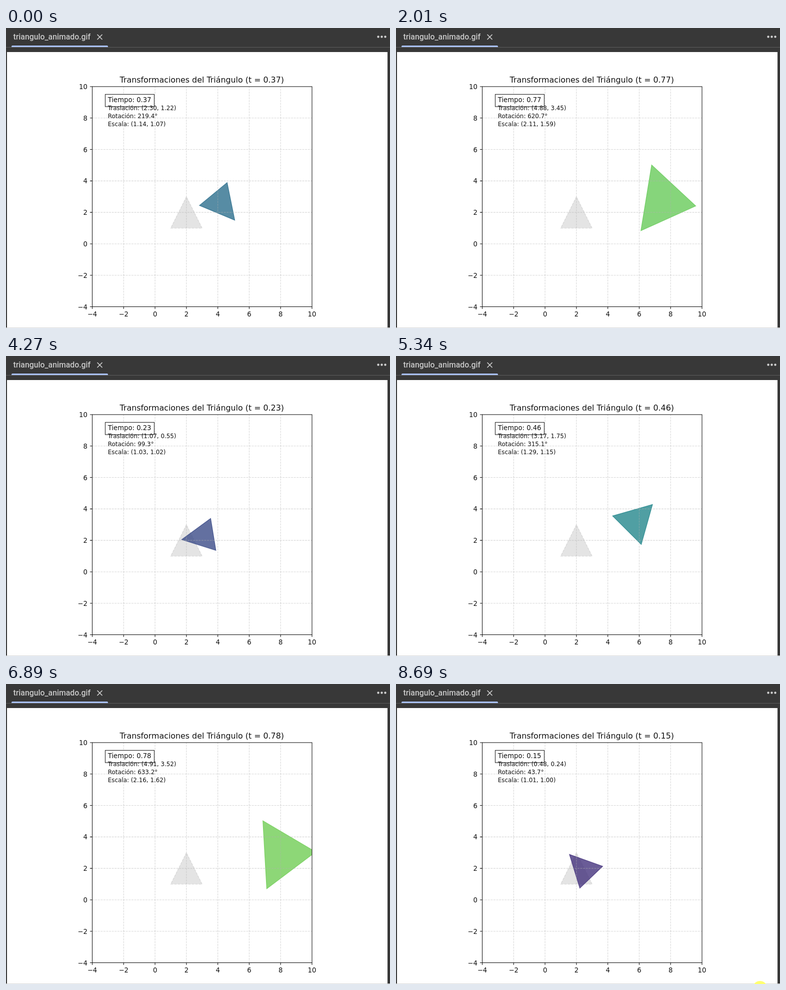
These frames come from a looping animation (768 by 599 pixels, 8.76 s). An HTML page:

```html
<!DOCTYPE html>
<html lang="es">
<head>
<meta charset="utf-8">
<title>Transformaciones del Triángulo</title>
<style>
  html, body { margin: 0; width: 100%; height: 100%; overflow: hidden; background: #383838; }
  svg { display: block; width: 100vw; height: 100vh; }
  text { font-family: "DejaVu Sans", sans-serif; font-size: 13.2px; fill: #111; }
  .tab { font: 500 15.8px Roboto, sans-serif; fill: #c9c9c9; }
  .title { font-size: 15.87px; text-anchor: middle; }
  .info text { font-size: 11.9px; }
  .xlabel { text-anchor: middle; }
  .ylabel { text-anchor: end; }
  .grid { stroke: #b0b0b0; stroke-opacity: .5; stroke-width: 1.06; stroke-dasharray: 3.9 1.7; }
  .tick { stroke: #111; stroke-width: 1.06; }
</style>
</head>
<body>
<svg viewBox="0 0 768 599" preserveAspectRatio="none">
  <defs><clipPath id="axes"><rect x="172.5" y="117" width="439.5" height="439.5"/></clipPath></defs>

  <rect width="768" height="599" fill="#383838"/>
  <rect y="38" width="768" height="1" fill="#5e5e5e"/>
  <path d="M11 38v-1q0-2 2-2h189q2 0 2 2v1z" fill="#a8c0f4"/>
  <text class="tab" x="14.5" y="23">triangulo_animado.gif</text>
  <path d="M182.5 13l10 10m0-10l-10 10" stroke="#d0d0d0" stroke-width="1.7"/>
  <g fill="#d0d0d0">
    <circle cx="744.5" cy="17.5" r="2.2"/><circle cx="751.5" cy="17.5" r="2.2"/><circle cx="758.5" cy="17.5" r="2.2"/>
  </g>
  <rect x="2" y="48" width="761" height="550" fill="#fff"/>
  <rect x="0" y="598" width="768" height="1" fill="#d9d9d9"/>

  <g clip-path="url(#axes)">
    <polygon id="ghost" fill="#808080" fill-opacity=".21" stroke="#808080" stroke-opacity=".21"
      stroke-width="1.32" stroke-dasharray="4.9 2.1"/>
    <polygon id="shape" fill-opacity=".8" stroke-opacity=".8" stroke-width="1.32"/>
    <g id="grid"></g>
  </g>
  <g id="ticks"></g>
  <rect x="172.5" y="117" width="439.5" height="439.5" fill="none" stroke="#111" stroke-width="1.06"/>

  <text id="title" class="title" x="391.8" y="109"></text>
  <rect x="198.5" y="132.5" width="98" height="24.5" fill="#fff" fill-opacity=".8" stroke="#333" stroke-width="1.2"/>
  <text id="time" x="203.8" y="148"></text>
  <g class="info">
    <text id="move" x="203.8" y="163.5"></text>
    <text id="turn" x="203.8" y="179.5"></text>
    <text id="size" x="203.8" y="195.7"></text>
  </g>
  <circle id="pointer" cx="728" cy="608" r="15" fill="#ffff70"/>
</svg>
<script>
const LOOP = 8760, STEPS = 120, UNIT = 439.5 / 14;
const $ = id => document.getElementById(id);
const px = x => 172.5 + (x + 4) * UNIT;
const py = y => 556.5 - (y + 4) * UNIT;
const points = list => list.map(([x, y]) => px(x).toFixed(2) + ',' + py(y).toFixed(2)).join(' ');

const triangle = [[1, 1], [3, 1], [2, 3]];
const center = [2, 5 / 3];
const viridis = ['440154', '482475', '414487', '355f8d', '2a788e', '21918c', '22a884', '44bf70', '7ad151', 'bddf26', 'fde725']
  .map(hex => [0, 2, 4].map(i => parseInt(hex.substr(i, 2), 16)));

// Redraw schedule: [ms, redraw count], evenly spaced in between.
const schedule = [[0, 0], [130, 1], [990, 14], [1060, 15], [1260, 18], [1880, 27], [1950, 28], [2770, 40],
  [2840, 41], [3680, 53], [3740, 54], [4270, 62], [4600, 67], [4660, 68], [5480, 80], [5550, 81],
  [6350, 93], [6420, 94], [6490, 95], [7360, 108], [7420, 109], [7560, 111], [8290, 122], [8350, 123], [8690, 128]];
// Playback progress: [ms, step].
const progress = [[0, 44], [1260, 75], [2770, 112], [4270, 149], [6350, 202], [7560, 232], [8690, 260]];

function interpolate(knots, v, from = 0, to = 1) {
  let i = 1;
  while (i < knots.length - 1 && v > knots[i][from]) i++;
  const a = knots[i - 1], b = knots[i];
  return a[to] + (b[to] - a[to]) * (v - a[from]) / (b[from] - a[from]);
}

const redraws = Array.from({ length: 129 }, (_, n) => Math.round(interpolate(schedule, n, 1, 0) / 10) * 10);

function color(t) {
  const i = Math.min(9, Math.floor(t * 10)), f = t * 10 - i;
  return `rgb(${viridis[i].map((c, k) => Math.round(c + (viridis[i + 1][k] - c) * f))})`;
}

// Two decimals, with exact ties going to the even digit.
const fixed = v => (v * 8 % 4 === 1 ? v - .001 : v).toFixed(2);

function draw(t) {
  const s = t * t * (3 - 2 * t);
  const move = [5 * Math.sin(s * Math.PI / 2), 4 * s];
  const size = [1 + 1.5 * s * s, 1 + .8 * s * s];
  const angle = 720 * s, rad = angle * Math.PI / 180;
  const cos = Math.cos(rad), sin = Math.sin(rad);

  // Scale about the origin, rotate about the centroid, then translate.
  $('shape').setAttribute('points', points(triangle.map(([x, y]) => {
    const dx = x * size[0] - center[0], dy = y * size[1] - center[1];
    return [center[0] + move[0] + dx * cos - dy * sin, center[1] + move[1] + dx * sin + dy * cos];
  })));
  $('shape').setAttribute('fill', color(t));
  $('shape').setAttribute('stroke', color(t));
  $('title').textContent = `Transformaciones del Triángulo (t = ${fixed(t)})`;
  $('time').textContent = `Tiempo: ${fixed(t)}`;
  $('move').textContent = `Traslación: (${move.map(fixed).join(', ')})`;
  $('turn').textContent = `Rotación: ${angle.toFixed(1)}°`;
  $('size').textContent = `Escala: (${size.map(fixed).join(', ')})`;
}

function buildAxes() {
  let grid = '', ticks = '';
  for (let v = -4; v <= 10; v += 2) {
    const x = px(v), y = py(v), label = String(v).replace('-', '−');
    if (v > -4 && v < 10) {
      grid += `<path class="grid" d="M${x} 556.5V117"/><path class="grid" d="M172.5 ${y}H612"/>`;
    }
    ticks += `<path class="tick" d="M${x} 556.5v4.6M172.5 ${y}h-4.6"/>
      <text class="xlabel" x="${x}" y="576.3">${label}</text>
      <text class="ylabel" x="162.8" y="${y + 5}">${label}</text>`;
  }
  $('grid').innerHTML = grid;
  $('ticks').innerHTML = ticks;
  $('ghost').setAttribute('points', points(triangle));
}

let shown = -1;
function frame() {
  const now = performance.now() % LOOP;
  let n = redraws.length - 1;
  while (redraws[n] > now) n--;
  if (n !== shown) {
    shown = n;
    draw(Math.round(interpolate(progress, redraws[n])) % (STEPS + 1) / STEPS);
    $('pointer').style.display = n === redraws.length - 1 ? '' : 'none';
  }
  requestAnimationFrame(frame);
}

buildAxes();
frame();
</script>
</body>
</html>
```
